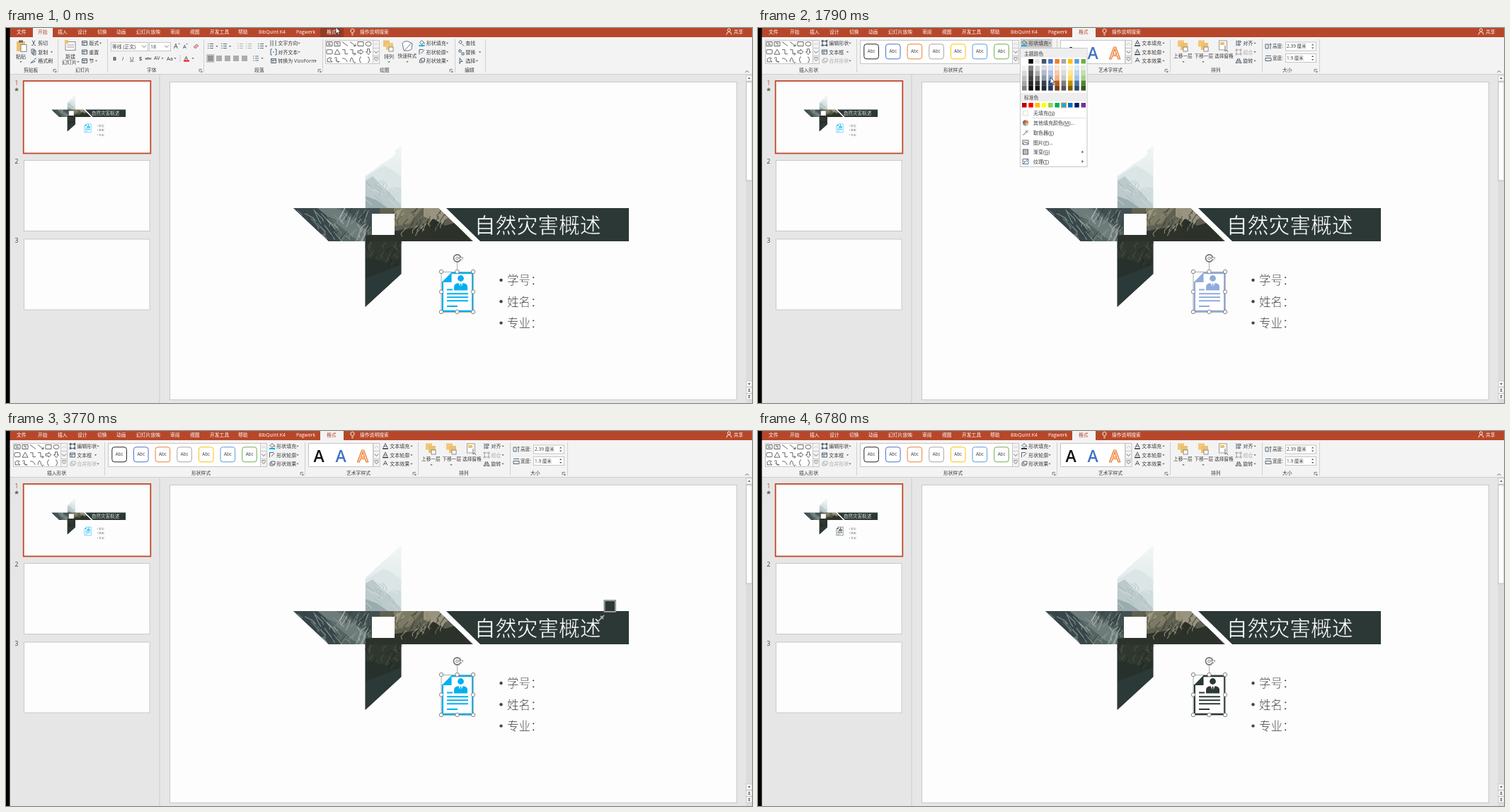
These frames come from a looping animation (1054x531 px, 7870 ms). An HTML page:

```html
<!DOCTYPE html>
<html>
<head>
<meta charset="utf-8">
<style>
html,body{margin:0;width:100%;height:100%;overflow:hidden;background:#e6e6e6}
svg{display:block;width:100vw;height:100vh}
text{font-family:'Open Sans','Noto Sans CJK SC','Noto Sans CJK',sans-serif;white-space:pre}
.cjk{font-family:'Noto Sans CJK SC','Noto Sans CJK',sans-serif;font-weight:300;stroke-width:.5}
</style>
</head>
<body>
<svg id="stage" viewBox="0 0 1054 531" xmlns="http://www.w3.org/2000/svg"></svg>
<script>
const RED = '#b7472a', DARK = '#2b3835', BLUE = '#00b0f0', PAPER = '#fdfdfd', INK = '#3a3a3a', LINE = '#c6c6c6';

// ---- markup helpers
const R = (x, y, w, h, fill = 'none', stroke = 'none', more = '') =>
  `<rect x="${x}" y="${y}" width="${w}" height="${h}" fill="${fill}" stroke="${stroke}" ${more}/>`;
const P = (d, fill = 'none', stroke = 'none', w = 1) =>
  `<path d="${d}" fill="${fill}" stroke="${stroke}" stroke-width="${w}"/>`;
const C = (x, y, r, fill = 'none', stroke = 'none', w = 1) =>
  `<circle cx="${x}" cy="${y}" r="${r}" fill="${fill}" stroke="${stroke}" stroke-width="${w}"/>`;
const T = (x, y, s, size = 7, fill = INK, more = '') =>
  `<text x="${x}" y="${y + size * .37}" font-size="${size}" fill="${fill}" ${more}>${s}</text>`;
const G = (id, body, more = '') => `<g id="${id}" ${more}>${body}</g>`;
const at = (x, y, body) => `<g transform="translate(${x} ${y})">${body}</g>`;
const chev = (x, y) => P(`M${x - 1.6} ${y - .8}h3.2l-1.6 1.8z`, '#555');
const drop = (x, y) => P(`M${x - 3} ${y - 1.5}l3 3 3-3`, 'none', '#555', .8);
const sep = x => P(`M${x} 16V63`, 'none', '#d0d0d0');
const launcher = x => P(`M${x - 2} 62.5v-4h4M${x - .5} 60l2.5 2.5m0-2v2h-2`, 'none', '#666', .8);
const label = (x, s) => T(x, 59, s, 6.8);
const icon = (x, y, d, stroke = '#555', fill = 'none') => at(x, y, P(d, fill, stroke, .9));
const ROWS = [21.5, 34, 46.5];

// ---- small glyphs, centred on 0,0
const BUCKET = 'M-3-1l3-3 3 3-3 3zM3-1l1 2', PEN = 'M-3.5 3.5v-7H2M-1 2l4.5-5', BLOCK = 'M-3-1.5l2-2h5v4l-2 2h-5zM-1-3.5v4h5',
  PAGE = 'M-3.5-3h7v6h-7zM-3.5-1h7M-1-1v4', COPY = 'M-3-4h4v6h-4zM-1-2h4v6h-4z', LINES = 'M-4-3h8M-4-1h8M-4 1h8M-4 3h8',
  LIST = 'M-4-3h1.5M-1-3h5M-4 0h1.5M-1 0h5M-4 3h1.5M-1 3h5', NODES = 'M-3-3h6v6h-6zM-4-4h2v2h-2zM2-4h2v2h-2zM-4 2h2v2h-2zM2 2h2v2h-2z';

const SHAPES = [
  'M-4-3h8v6h-8zM-2-1h3M-2 1h4', 'M-4-3h8v6h-8zM-2-1h3M1-1v3', 'M-4-3L4 3', 'M-4-3L4 3m0-3v3h-3', 'M-4-3h8v6h-8z', 'M-4 0a4 3 0 0 1 8 0a4 3 0 0 1-8 0',
  'M-3-3h6q1 0 1 1v4q0 1-1 1h-6q-1 0-1-1v-4q0-1 1-1', 'M0-3.5l4 7h-8z', 'M-4-3h4v6h4', 'M-4-3h4v6h4m-2-2l2 2-2 2', 'M-4-1.5h4v-2l4 3.5-4 3.5v-2h-4z', 'M-1.5-4h3v4h2L0 4l-3.5-4h2z',
  'M-3 3v-4l3-2 3 1-2 2 3 3z', 'M-4-2q4-3 3 1t4 4q-4 1-5-3', 'M-4-2q6 0 7 5', 'M-4 3q2-10 4-3t4 3', 'M1-4q-2 0-2 2t-1 2q1 0 1 2t2 2', 'M-1-4q2 0 2 2t1 2q-1 0-1 2t-2 2'];

const spinner = x => [17.5, 28.5, 39.5].map((y, i) =>
  R(x, y, 9, 11, '#f3f3f3', LINE) + (i ? drop(x + 4.5, y + 5.5) : P(`M${x + 2} 24l2.5-2.5 2.5 2.5`, 'none', '#bbb', .8)) +
  (i > 1 ? P(`M${x + 1.5} 42h6`, 'none', '#555', .8) : '')).join('');
const gallery = x => R(x, 17.5, 67, 33, '#fff', LINE) + spinner(x + 67) +
  SHAPES.map((d, i) => icon(x + 5.5 + i % 6 * 11, 22.5 + (i / 6 | 0) * 11.2, d)).join('');

// three stacked buttons: [icon, text, chevron offset, grey]
const stack = (x, items) => items.map(([d, s, c, grey], i) =>
  icon(x, ROWS[i], d, grey ? '#aaa' : '#456') + T(x + 6.2, ROWS[i], s, 7, grey ? '#aaa' : INK) + (c ? chev(x + c, ROWS[i]) : '')).join('');
const fillStack = (x, id) => stack(x, [[BUCKET, '形状填充', 36], [PEN, '形状轮廓', 36], [BLOCK, '形状效果', 36]]) +
  R(x - 4, 24, 8, 2, BLUE, 'none', id ? `id="${id}"` : '');
const layers = (x, a, b) => R(x, 17.5, 9, 9, a) + R(x + 4, 21, 10, 10, b) + R(x + 8, 27, 6, 6, '#fff', '#888');

// ---- frame of the window
const tabs = [[15, '文件'], [45, '开始'], [73, '插入'], [101, '设计'], [129, '切换'], [156, '动画'], [184, '幻灯片放映'], [232, '审阅'],
  [260, '视图'], [288, '开发工具'], [328, '帮助'], [357, 'BibQuint K4'], [410, 'Pagwerk'], [453, '格式'], [500, '操作说明搜索'], [1028, '共享']];
const tabOn = (x, w, tx, s) => R(x, 0, w, 13.5, '#f3f3f3') + T(tx, 5, s, 6.8, RED);

const chrome = R(0, 0, 1054, 531, '#e6e6e6') + R(5, 0, 1049, 13.5, RED) + R(5, 13, 1049, 52.5, '#f3f3f3') +
  P('M5 65.5H1054', 'none', '#d0d0d0') + P('M1044.5 63l2.5-2.5 2.5 2.5', 'none', '#555', .9) +
  G('tabHover', R(444, 0, 33, 13, '#953a22')) + tabs.map(([x, s]) => T(x, 5, s, 6.8, '#fff')).join('') +
  C(489.5, 4, 2.6, 'none', '#fff', .9) + P('M488 8.3h3M488.5 10h2', 'none', '#fff', .8) +
  C(1021.5, 3, 2, 'none', '#fff', .9) + P('M1018 9.5q0-4 3.5-4t3.5 4', 'none', '#fff', .9) +
  R(0, 0, 5.5, 531, '#000') + P('M217 66V531', 'none', '#c9cccc') +
  R(1045.5, 66, 9, 465, '#dcdcdc') + R(1046, 76.5, 8, 139.5, '#fff', '#bbb') + R(1046, 67, 8, 8, '#fff', '#ccc') + P('M1048 72l2-2.5 2 2.5z', '#666') +
  [500, 509, 518].map(y => R(1046, y, 8, 8, '#fff', '#ccc')).join('') + P('M1048 503h4l-2 2.5zM1048 512.5l2-2 2 2zm0 2.5l2-2 2 2zM1048 520h4l-2 2zm0 2.5h4l-2 2z', '#555');

// ---- home ribbon
const home = tabOn(38, 28, 45, '开始') + [73.5, 143.5, 279.5, 447.5, 634.5, 677.5].map(sep).join('') + [69, 275, 443, 629].map(launcher).join('') +
  label(25, '剪贴板') + label(98, '幻灯片') + label(199, '字体') + label(351, '段落') + label(528, '绘图') + label(648, '编辑') +
  R(15, 19, 12, 14, '#eec06c') + R(18, 17.5, 6, 3, '#666') + R(21, 23.5, 8, 10, '#fff', '#888') + T(14, 40, '粘贴') + chev(21, 48) +
  stack(39, [['M-2-4l3 6M2-4l-3 6M-3 3h2M1 3h2', '剪切'], [COPY, '复制', 25.5], ['M-4 3l4-4 2 2zM1-2l3-2', '格式刷']]) +
  R(84, 19.5, 14, 12, '#fff', '#888') + R(83, 17, 5, 5, '#eec06c') + P('M86 24h10M86 27h10', 'none', '#999') + T(84, 40, '新建') + T(79, 48, '幻灯片') + chev(102, 48) +
  stack(111, [[PAGE, '版式', 22.5], [PAGE, '重置'], [PAGE, '节', 16.5]]) +
  R(148.5, 20.5, 52, 12, '#fff', LINE) + T(150, 26, '等线 (正文)', 6.8) + drop(195, 26) + R(202.5, 20.5, 30, 12, '#fff', LINE) + T(204, 26, '18') + drop(227, 26) +
  T(237, 26, 'A', 9) + T(250, 26.5, 'A', 7.5) + P('M243.5 23l1.2-1.5 1.2 1.5zM254.5 22h2.4l-1.2 1.5z', '#2b6cb0') + icon(268, 26, 'M-3 1l4-4 3 2-4 4z', '#c66', '#e8a8b8') +
  T(151, 43, 'B', 7.5, INK, 'font-weight="700"') + T(164, 43, 'I', 7.5, INK, 'font-style="italic"') + T(175, 43, 'U', 7.5, INK, 'text-decoration="underline"') +
  T(188, 43, 'S', 7.5, INK, 'font-weight="700"') + T(196.5, 43, 'abc', 5.5, INK, 'text-decoration="line-through"') + T(209, 42, 'AV', 7) + chev(221, 43) +
  T(227, 43, 'Aa', 7.5) + chev(239, 43) + P('M246 38v10', 'none', '#ccc') + T(252, 42, 'A', 8) + R(251, 45.5, 8, 2, '#e00') + chev(264, 43) +
  [289, 308, 331, 343, 360].map(x => icon(x, 25.5, LIST, x > 320 && x < 350 ? '#aaa' : '#456')).join('') + [298, 316.5, 367.5].map(x => chev(x, 26)).join('') +
  R(283, 37, 11.5, 12, LINE) + [289, 301, 313, 325, 337].map(x => icon(x, 43, LINES)).join('') + icon(353, 43, LIST, '#468') + chev(362, 43) +
  stack(378, [['M-4-4v8M-1-4v8M3-4v8', '文字方向', 36], ['M-4-4h2M-4 4h2M-4-4v8M4-4h-2M4 4h-2M4-4v8M-1 0h2', '对齐文本', 36], [PAGE, '转换为 VizoForm', 59.5]]) +
  gallery(451.5) + layers(533, '#eec06c', '#f0c878') + T(534, 40, '排列') + chev(541, 48) +
  P('M560 22q2-4 8-3l6 3-1 8q-6 4-11 1zM562 33l11-12', '#fff', '#678') + T(553.5, 40, '快速样式', 6.7) + chev(567, 48) +
  fillStack(587.5) + stack(643, [['M1-1a2 2 0 1 0-3 1a2 2 0 0 0 3-1M1 1l3 3', '查找'], ['M-3-3h3v3h-3zM1 1h3v3h-3z', '替换', 26.5], ['M-2-4l4 5h-3l-1 3z', '选择', 22.5]]);

// ---- format ribbon
const styleCols = ['#222', '#4472c4', '#ed7d31', '#a5a5a5', '#ffc000', '#5b9bd5', '#70ad47'];
const bigA = (x, fill, more = '') => T(x, 35, 'A', 23, fill, `text-anchor="middle" font-weight="600" ${more}`);
const sizeBox = (y, s, v, d) => icon(721, y, d, '#456') + T(727, y, s, 6.5) + R(745.5, y - 6, 43, 12, '#fff', LINE) + T(747, y, v, 6.5) +
  P(`M782 ${y - 1.5}l1.7-2 1.7 2zM782 ${y + 1.5}h3.4l-1.7 2z`, '#555');
const format = [139.5, 422.5, 582.5, 712.5, 793.5].map(sep).join('') + [418, 577, 788].map(launcher).join('') +
  label(58, '插入形状') + label(262, '形状样式') + label(481, '艺术字样式') + label(640, '排列') + label(741, '大小') +
  gallery(10.5) + stack(94, [[NODES, '编辑形状', 36], [PAGE, '文本框', 32.5], [BLOCK, '合并形状', 36, 1]]) +
  R(144.5, 17.5, 215, 33, '#fff', LINE) + spinner(359.5) +
  styleCols.map((c, i) => R(149.8 + i * 30.65, 22.8, 20.6, 21, '#fff', c, 'rx="3.5"') + T(160.1 + i * 30.65, 32.5, 'Abc', 6.2, INK, 'text-anchor="middle"')).join('') +
  R(371, 15.5, 44.5, 12, LINE, 'none', 'id="rowHover"') + fillStack(376, 'fillBar') +
  R(427.5, 17.5, 91, 33, '#fff', LINE) + spinner(519) + bigA(442, '#111') + bigA(473, '#4472c4') + bigA(504, '#fbe0cc', 'stroke="#ed7d31" stroke-width="1.2"') +
  stack(536, [['M-3 2l3-6 3 6M-2 0h4', '文本填充', 37], ['M-3 2l3-6 3 6M-2 0h4', '文本轮廓', 37], ['M-3 2l3-6 3 6M-2 0h4', '文本效果', 37]]) + P('M532 25h8M532 37.5h8', 'none', '#333', 1.6) +
  layers(593, '#f0c878', '#eec06c') + layers(622, '#f0c878', '#eec06c') + R(651.5, 18, 11, 13, '#fff', '#999') + R(653, 20, 6, 4, '#eec06c') + P('M660 25v8l2-2 2 3', '#fff', '#666') +
  T(587, 40, '上移一层', 6.7) + T(616.5, 40, '下移一层', 6.7) + T(645, 40, '选择窗格', 6.7) + chev(601, 48) + chev(629, 48) +
  stack(679, [['M-3-4v8M-1-3h4v2h-4zM-1 1h3v2h-3z', '对齐', 23], [NODES, '组合', 23, 1], ['M-4 3l3-6v6zM1 3v-6l3 6z', '旋转', 23]]) +
  sizeBox(26, '高度:', '2.39 厘米', 'M-4-3h4v6h-4zM3-4v8M1.5-2.5l1.5-1.5 1.5 1.5') + sizeBox(42.5, '宽度:', '1.9 厘米', 'M-4 0h8v4h-8zM-4-3h8');

// ---- fill menu
const theme = ['#fff', '#000', '#e7e6e6', '#44546a', '#4472c4', '#ed7d31', '#a5a5a5', '#ffc000', '#5b9bd5', '#70ad47'];
const standard = ['#c00000', '#f00', '#ffc000', '#ff0', '#92d050', '#00b050', BLUE, '#0070c0', '#002060', '#7030a0'];
const shade = { 0: [-.05, -.15, -.25, -.35, -.5], 1: [.5, .35, .25, .15, .05], 2: [-.1, -.25, -.5, -.75, -.9] };
const cell = (i, y, c, h = 6.5, more = '') => R(373 + i * 9.28, y, 6.5, h, c, 'none', more);
const tints = theme.map((c, i) => (shade[i] || [.8, .6, .4, -.25, -.5]).map((k, j) =>
  cell(i, 53.5 + j * 7, c, 7) + cell(i, 53.5 + j * 7, k > 0 ? '#fff' : '#000', 7, `opacity="${Math.abs(k)}"`)).join('')).join('');
const item = (y, s, key, tail = '') => T(389, y, `${s}(<tspan text-decoration="underline">${key}</tspan>)${tail}`);
const menu = R(370.5, 28.5, 94.5, 168, '#fff', LINE) + R(371, 29, 93.5, 13, '#eee') + T(376, 36, '主题颜色', 6.8) +
  theme.map((c, i) => cell(i, 44, c)).join('') + tints + R(371, 92, 93.5, 12, '#eee') + T(376, 98, '标准色', 6.8) +
  standard.map((c, i) => cell(i, 106, c)).join('') + R(428.6, 105.9, 6.8, 6.8, 'none', '#f29436') +
  R(371, 141.5, 93.5, 13.5, '#c5c5c5', 'none', 'id="itemHover"') + P('M387 127.5H464', 'none', '#e0e0e0') +
  R(374.5, 117, 7, 7, '#fff', '#ddd') + item(120, '无填充', 'N') + item(134.5, '其他填充颜色', 'M', '...') + item(148.3, '取色器', 'E') +
  item(162, '图片', 'P', '...') + item(175.5, '渐变', 'G') + item(189, '纹理', 'T') +
  C(378, 134.5, 4, '#5b9bd5') + P('M378 134.5v-4a4 4 0 0 1 4 4z', '#ed7d31') + P('M378 134.5h-4a4 4 0 0 1 4-4z', '#c0504d') + P('M378 134.5v4a4 4 0 0 0 4-4z', '#f2c14e') +
  icon(378, 148.3, 'M-3.5 3.5l5-5M0-3l3 3M2-2l1.5-1.5', '#444') + icon(378, 162, 'M-4-3h8v6h-8zM-4 2l3-3 2 2 1-1 2 2', '#456') +
  R(374.5, 172, 7, 7, '#bbb', '#666') + icon(378, 189, 'M-4-3.5h8v7h-8zM-3 3l6-6M-3-1l2 2M1-2l2 2', '#468') + P('M457.5 173.5l2.5 2-2.5 2zM457.5 187l2.5 2-2.5 2z', '#555');

// ---- slide artwork
let seed = 7;
const rnd = (a, b) => (seed = seed * 16807 % 2147483647, (a + (b - a) * seed / 2147483647).toFixed(1));
const streaks = (n, x0, x1, y0, y1, cols, dx, dy, w) => Array.from({ length: n }, (_, i) =>
  `<path d="M${rnd(x0, x1)} ${rnd(y0, y1)}l${rnd(dx * .4, dx)} ${rnd(dy * .3, dy)}l${rnd(-3, 5)} ${rnd(2, 6)}" fill="none" stroke="${cols[i % cols.length]}" stroke-width="${w}" opacity=".6"/>`).join('');
const stops = [[0, '#f3f6f6'], [.2, '#e4ecec'], [.4, '#d0dcdd']].map(([o, c]) => `<stop offset="${o}" stop-color="${c}"/>`).join('');
const photo = R(400, 160, 270, 240, 'url(#sky)') +
  P('M508 211l14-9 12-7 10 5 14 10v50h-50z', '#dbe5e6') + P('M508 216l10-6 18 18 22 22v12h-50z', '#bccacc') + P('M508 238l16 6 20 14h-36z', '#9aacae') + P('M558 226v24l-20-20 8-5z', '#cfdbdc') +
  streaks(18, 508, 545, 210, 246, ['#e3ebeb', '#9db0b2'], 10, 9, 1) +
  R(400, 255, 130, 48, '#56645f') + P('M406 255h40l28 47h-22z', '#39474a') + P('M440 255h30l38 30v17h-10z', '#6d7c7b') + P('M478 255h50v40l-14-8z', '#414f50') +
  streaks(34, 410, 470, 253, 294, ['#b9c4c0', '#2f3c3c', '#8d9b98'], 13, 16, 1.1) + streaks(34, 470, 518, 253, 294, ['#c6cec9', '#2c3838', '#8d9b98'], -10, 17, 1.1) +
  R(528, 255, 140, 48, '#5f6051') + P('M548 255h40l-18 22-22 4z', '#7c7a64') + P('M590 255h22l12 14-8 8-26-10z', '#98947f') + P('M508 294l50-8 24-4 22-12 16 10 14-4 28 30H508z', '#2c322a') +
  streaks(54, 548, 622, 254, 284, ['#bcb7a2', '#343a2f', '#8c8a70', '#262c25'], -8, 10, 1.2) +
  R(500, 302, 60, 95, '#28302c') + P('M508 302h50v20l-20 10-30-8z', '#30372f') + P('M508 355l50-20v20l-50 42z', '#2b3a38') +
  streaks(26, 512, 558, 300, 332, ['#555b4a', '#1b231f', '#3c4338'], -6, 8, 1.2);
const defs = `<defs><linearGradient id="sky" x2="0" y2="1">${stops}</linearGradient>
  <clipPath id="cross"><path d="M558.5 162V255H611L660 302H558.5V348L507.5 395V302H456L406 255H507.5V208Z"/></clipPath>` +
  G('art', G('photo', photo, 'clip-path="url(#cross)"') + R(517, 263, 32, 30, PAPER) + P('M622 255H880V302H670Z', DARK) +
    `<text class="cjk" x="661.8" y="289.8" font-size="29.8" fill="#fff" stroke="${DARK}">自然灾害概述</text>` +
    ['学号', '姓名', '专业'].map((s, i) => C(699.5, 357 + i * 30.3, 2.2, '#444') +
      `<text class="cjk" x="708" y="${363.3 + i * 30.3}" font-size="16.5" fill="#3c3c3c" stroke="${PAPER}">${s}：</text>`).join('')) +
  G('doc', P('M629 347H659.2V400.8H616.8V359', '#fff', 'currentColor', 2.3) + P('M615.8 360L629.5 346V360Z', 'currentColor') +
    C(642.5, 354.5, 4.4, 'currentColor') + P('M633 371.5v-5q0-4.6 6-5.3h7q6 .7 6 5.3v5z', 'currentColor') + P('M639.6 361h5.8l-2.9 9.5z', '#fff') + P('M641.7 362h1.6l.8 6-1.6 2-1.6-2z', 'currentColor') +
    P('M623 370.5h8M623 376.3h30M623 381.3h30M623 386.3h30M623 394h15', 'none', 'currentColor', 1.9)) + '</defs>';
const use = (ref, id = '') => `<use href="#${ref}" ${id && `id="${id}"`} color="${BLUE}"/>`;
const handles = [[615, 345], [637.5, 345], [660, 345], [615, 373.5], [660, 373.5], [615, 402], [637.5, 402], [660, 402]];
const slide = R(231.5, 76.5, 801, 450, PAPER, '#c3caca') + use('art') +
  G('veil', P('M506 206.5L559 159V165L553 172 549 180 540 187 530 193 520 201 507 210Z', PAPER) + C(553, 174, 3, '#eef2f2')) + use('doc', 'mainDoc') +
  R(615, 345.5, 45, 57, 'none', '#999', 'stroke-width=".8"') + P('M637.5 331V345', 'none', '#999', .8) +
  handles.map(([x, y]) => C(x, y, 2.7, '#fff', '#777', .9)).join('') +
  C(637.5, 326, 5, '#fff', '#777', 1.8) + C(637.5, 326, 1.8, '#fff', '#777', .9) + P('M640 325h6l-3 4z', '#fff', '#777', .8);
const thumbs = [[1, 78, RED], [2, 189, INK], [3, 301, INK]].map(([n, y, c]) => T(12.5, y, n, 8.5, c)).join('') +
  P('M15 84l.9 2 2.1.2-1.5 1.4.5 2.2-2-1.2-2 1.2.5-2.2-1.5-1.4 2.1-.2z', '#666') +
  R(24.7, 75, 179.6, 102.5, PAPER, '#c0472a', 'stroke-width="1.8"') + R(25.5, 187.5, 177.5, 100, PAPER, '#c3caca') + R(25.5, 299, 177.5, 100, PAPER, '#c3caca') +
  `<g transform="translate(25.5 76) scale(.2212) translate(-231 -76)">${use('art')}${use('doc', 'thumbDoc')}</g>`;

const picker = R(9, -30.5, 16.5, 17, PAPER, '#8a8a8a', 'id="swatch"') + R(10, -29.5, 14.5, 15, 'none', '#ddd', 'stroke-width=".7"') +
  P('M0 0l6-6M4-8l4 4M6-6l3-3', 'none', '#fff', 1.4) + P('M0 0l6-6M4-8l4 4M6-6l3-3', 'none', '#777', .6);

const stage = document.getElementById('stage');
stage.innerHTML = defs + chrome + G('home', home) + G('formatTab', tabOn(444, 33, 453, '格式')) + G('format', format) + thumbs + slide +
  G('menu', menu) + G('picker', picker) + G('arrow', P('M0 0V9.2L2.2 7.3 3.8 10.8 5.4 10.1 3.8 6.7H6.8Z', '#fff', '#222', .8));

// ---- timeline: each row holds from its time until the next
const ARROW = [[0, 466, -1], [150, 464, 2], [430, 462, 3], [580, 440, 18], [700, 419, 29], [850, 417, 29], [1000, 415, 27], [1120, 414.5, 23],
  [1670, 413, 36], [1790, 413, 70], [1910, 413, 100], [2030, 412, 128], [2150, 412, 150], [2300, 411.5, 164], [2420, 411.5, 166], [2570, 412, 171],
  [2720, 412, 162], [2840, 413, 148], [3140], [4590, 844, 290], [4740, 701, 337], [4880, 654, 353], [5030, 648, 352], [5160, 645, 350],
  [5300, 720, 340], [5420, 860, 370], [5540, 1005, 400], [5660], [5970, 1047, 489], [6090, 1040, 500], [6210, 1033, 515],
  [6360, 1042, 520], [6480, 1041, 527], [6630, 1041, 530], [6780]];
const PICKER = [[0], [3140, 442, 145], [3260, 540, 165], [3380, 654, 190], [3500, 750, 225], [3620, 794, 246],
  [3770, 836, 270], [3920, 845, 275], [4040, 851, 279], [4190, 857, 279], [4470]];
const ITEM = [[0, -50], [2150, 141.5], [2300, 155.2], [2570, 168.8], [2720, 155.2], [2840, 141.5]];
const ROW = [[0, -50], [850, 28], [1000, 15.5], [3140, -50]];
const MAIN = [[0, BLUE], [1790, '#8faadc'], [1910, BLUE], [4470, DARK]];
const THUMB = [[0, BLUE], [4740, '#25809f'], [4880, '#2a6075'], [5030, '#2b4852'], [5160, DARK]];
const FADE = [[0, 0], [430, .45], [580, .8], [700, 1]];
const MENU = [[0, 0], [1520, .8], [1670, 1], [3140, 0]];
const LOOP = 7870;

const el = id => document.getElementById(id);
const pick = (rows, t) => rows.reduce((hit, row) => row[0] <= t ? row : hit).slice(1);
const show = (id, on) => el(id).style.display = on ? '' : 'none';
const place = (id, [x, y]) => {
  show(id, x !== undefined);
  if (x !== undefined) el(id).setAttribute('transform', `translate(${x} ${y})`);
};

function draw(t) {
  place('arrow', pick(ARROW, t));
  place('picker', pick(PICKER, t));
  el('swatch').setAttribute('fill', t < 3770 ? PAPER : DARK);
  el('itemHover').setAttribute('y', pick(ITEM, t));
  el('rowHover').setAttribute('y', pick(ROW, t));
  el('mainDoc').setAttribute('color', pick(MAIN, t));
  el('thumbDoc').setAttribute('color', pick(THUMB, t));
  el('fillBar').setAttribute('fill', t < 4470 ? BLUE : DARK);
  el('format').setAttribute('opacity', pick(FADE, t));
  el('menu').setAttribute('opacity', pick(MENU, t));
  show('home', t < 430);
  show('tabHover', t < 430);
  show('formatTab', t >= 430);
  show('veil', t < 3260);
}
function tick() {
  draw(performance.now() % LOOP);
  requestAnimationFrame(tick);
}
tick();
</script>
</body>
</html>
```
